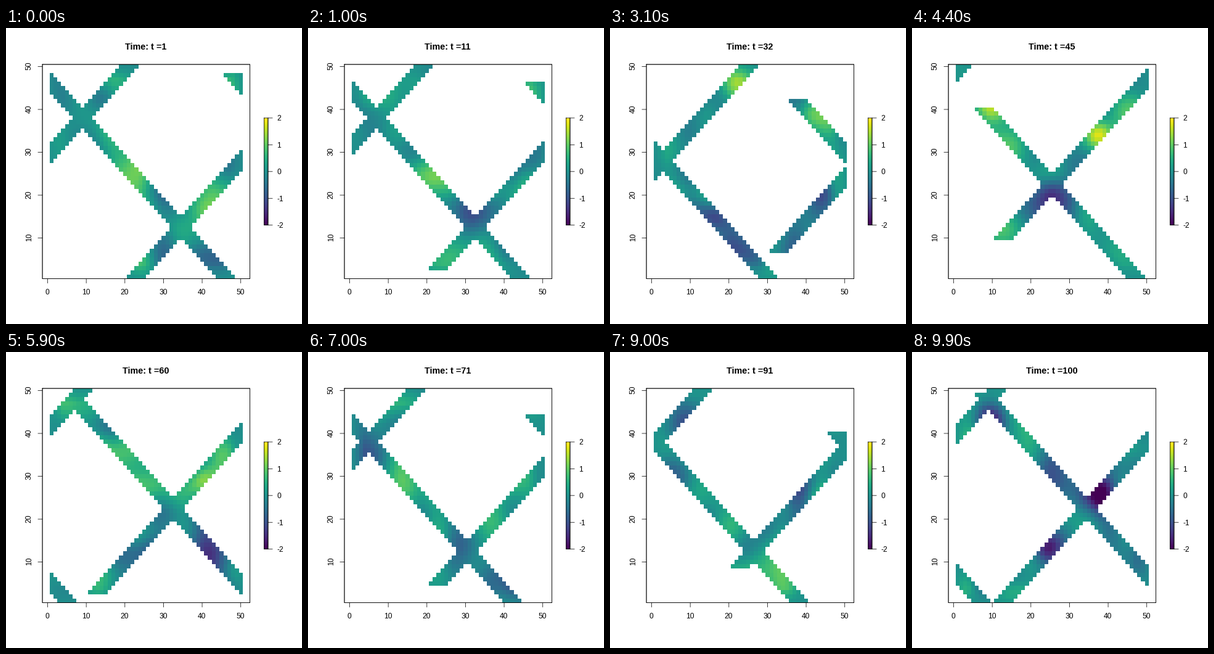
A matplotlib script for the animation above (10 s loop, 480 px wide and 480 px high).

```python
import numpy as np
import matplotlib.pyplot as plt
from matplotlib.animation import FuncAnimation

plt.rcParams["font.family"] = "Liberation Sans"

N = 50            # grid cells per side
STEPS = 100
CYCLE = 50        # the swaths repeat after this many steps
SWATH = 5         # swath width in cells
LEFT, RIGHT, TOP, BOTTOM = 59.04, 395.6, 59.04, 406.56
X0, DX = 67.5, 6.264
DY = (BOTTOM - TOP) / N
BAR = (418.44, 424.92, 145.92, 319.68)

gx, gy = np.meshgrid(np.arange(1, N + 1), np.arange(1, N + 1))


def px(x):
    return X0 + DX * x


def py(y):
    return BOTTOM - DY * (y - 0.5)


# --- slowly drifting field: seeded random waves plus a few strong spots ---

# step, column, row, height
SPOTS = [(1, 39, 17, 0.9), (1, 14, 43, -0.8), (27, 41, 39.5, 1.3),
         (33, 16, 15, -1.3), (33, 21, 46, 1.1), (28, 45, 20, -1.0),
         (45, 37.5, 34, 2.4), (45, 25, 21, -1.2), (45, 9, 40, 1.2),
         (60, 40, 29.5, 1.6), (82, 45, 20, -1.9), (82, 25, 4.5, 1.2),
         (100, 24, 13, -1.7), (100, 38, 26, -1.7), (100, 10, 43, -1.2)]
WAVES = 60

rng = np.random.default_rng(7)
kx, ky = rng.normal(0, 0.3, (2, WAVES, 1, 1))
omega = rng.normal(0, 0.12, (WAVES, 1, 1))
phase = rng.uniform(0, 2 * np.pi, (WAVES, 1, 1))
edge = np.minimum(np.minimum(gx, N + 1 - gx), np.minimum(gy, N + 1 - gy))
taper = np.clip(edge / 4, 0.2, 1)


def field(t):
    waves = np.cos(kx * gx + ky * gy + omega * t + phase).sum(axis=0)
    z = 0.4 * taper * waves * np.sqrt(2 / WAVES)
    for t0, x, y, a in SPOTS:
        d2 = (gx - x) ** 2 + (gy - y) ** 2
        z += a * np.exp(-d2 / 14 - ((t - t0) / 8) ** 2)
    return z


def swaths(t):
    """Cells seen at step t; running off the right edge wraps in row order."""
    s = t % CYCLE
    k = np.arange(N + 1)[:, None]
    j = np.arange(SWATH)
    up = 11 + 10 * s + (N + 1) * k + j
    down = 2406 - 10 * s - (N - 1) * k + j
    idx = np.concatenate([up.ravel(), down.ravel()])
    idx = idx[(idx >= 1) & (idx <= N * N)]
    seen = np.zeros(N * N, bool)
    seen[idx - 1] = True
    return seen.reshape(N, N)


# cell edges on whole pixels
edges = np.arange(N + 1) + 0.5
cols = np.rint(px(edges)).astype(int)
rows = np.rint(py(edges)).astype(int)
widths, heights = np.diff(cols), -np.diff(rows)


def to_pixels(z):
    return z.repeat(heights, axis=0).repeat(widths, axis=1)[::-1]


# --- stage, drawn in pixel coordinates ---

fig = plt.figure(figsize=(480 / 72, 480 / 72), dpi=72, facecolor="white")
ax = fig.add_axes([0, 0, 1, 1])
ax.axis("off")


def picture(z, extent):
    return ax.imshow(z, cmap="viridis", vmin=-2, vmax=2, aspect="auto",
                     interpolation="nearest", extent=extent)


def line(xs, ys):
    ax.plot(xs, ys, color="black", lw=0.75, snap=False, zorder=3,
            solid_capstyle="round")


def frame_box(x0, x1, y0, y1):
    line([x0, x1, x1, x0, x0], [y0, y0, y1, y1, y0])


def label(x, y, s, **kw):
    ax.text(x, y, s, fontsize=12, **kw)


cells = picture(to_pixels(np.zeros((N, N))),
                (cols[0], cols[-1], rows[0], rows[-1]))
bar_px = np.rint(BAR)
picture(np.linspace(2, -2, int(bar_px[3] - bar_px[2]))[:, None],
        (bar_px[0], bar_px[1], bar_px[3], bar_px[2]))

for _ in range(2):
    frame_box(LEFT, RIGHT, TOP, BOTTOM)
for v in range(0, 51, 10):
    line([px(v)] * 2, [BOTTOM, BOTTOM + 7.2])
    label(px(v) - 0.5, 432, str(v), ha="center", va="baseline")
    if v:
        line([LEFT - 7.2, LEFT], [py(v)] * 2)
        label(37.8, py(v) - 1, str(v), rotation=90, ha="center", va="center")

frame_box(*BAR)
line([BAR[1]] * 2, BAR[2:])
for v in range(-2, 3):
    y = np.interp(v, [-2, 2], [BAR[3], BAR[2]])
    line([BAR[1], BAR[1] + 7.2], [y, y])
    label(439.4, y + 4.3, str(v), ha="left", va="baseline")

title = ax.text((LEFT + RIGHT) / 2 - 0.6, 35, "", fontsize=14.4,
                weight="bold", ha="center", va="baseline")
ax.set_xlim(0, 480)
ax.set_ylim(480, 0)


def draw(i):
    t = i + 1
    z = np.ma.masked_where(~swaths(t), field(t))
    cells.set_data(to_pixels(z))
    title.set_text(f"Time: t ={t}")
    return cells, title


anim = FuncAnimation(fig, draw, frames=STEPS, interval=100, repeat=True)
plt.show()
```
